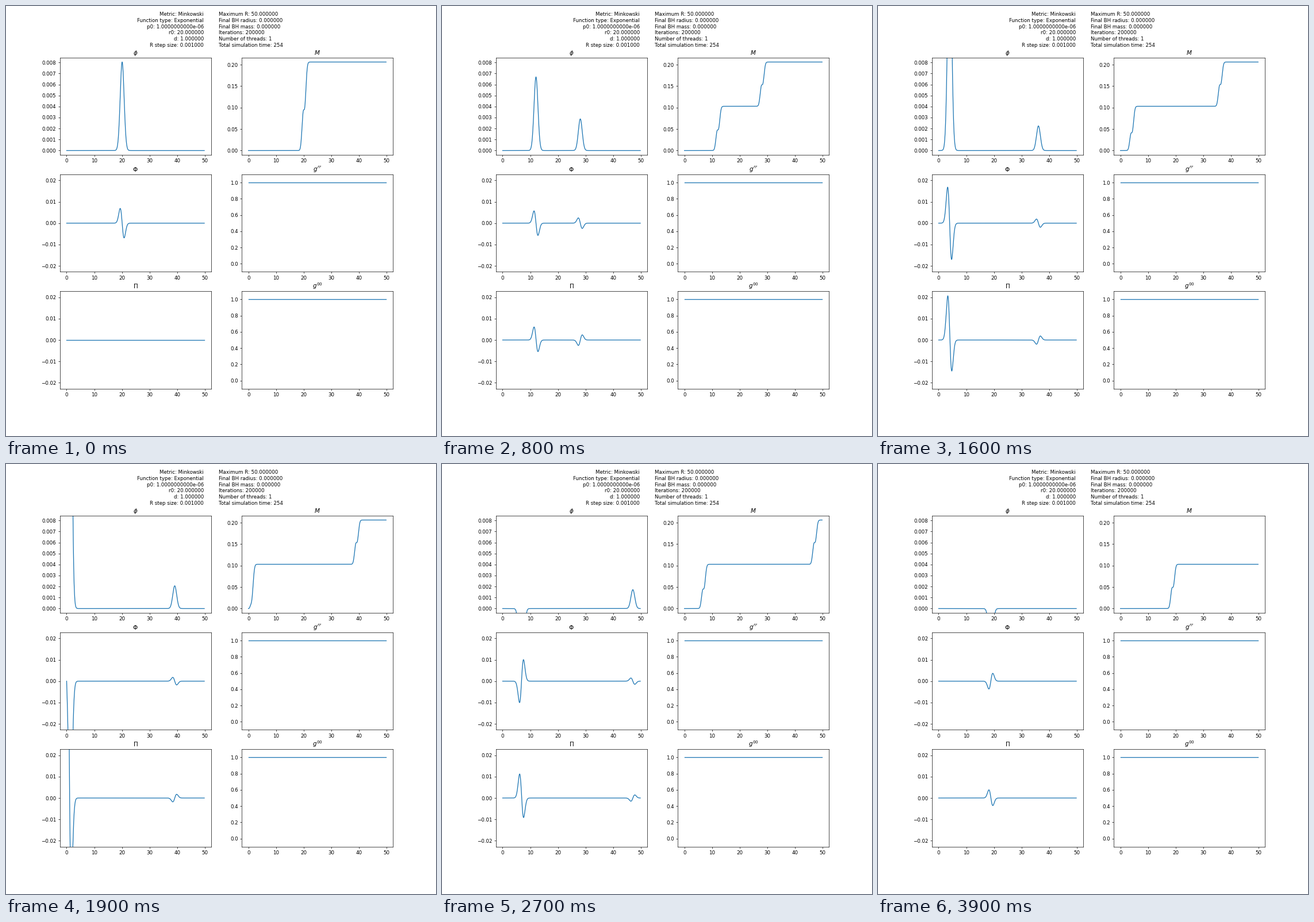
These frames come from a looping animation (748 by 748 pixels, 4000 ms). A matplotlib script:

```python
import numpy as np
import matplotlib.pyplot as plt
from matplotlib.animation import FuncAnimation

SIZE = 748
FRAMES, INTERVAL = 40, 100
P0, R0 = 1e-6, 20.0

r = np.arange(0, 49.81, 0.05)
r[0] = 1e-4  # keep divisions by r finite


def profile(s):
    """Odd extension of r * phi at the start."""
    a = np.abs(s)
    return P0 * s * a**3 * np.exp(-(a - R0)**2)


def slope(s):
    a = np.abs(s)
    return P0 * a**3 * np.exp(-(a - R0)**2) * (4 - 2 * a * (a - R0))


def fields(t):
    """Spherical wave: field, radial and time derivatives, enclosed mass."""
    out, inc = r - t, r + t
    phi = (profile(inc) + profile(out)) / (2 * r)
    grad = ((slope(inc) + slope(out)) / 2 - phi) / r
    rate = (slope(inc) - slope(out)) / (2 * r)
    density = 2 * np.pi * r**2 * (grad**2 + rate**2)
    steps = np.diff(r) * (density[1:] + density[:-1]) / 2
    mass = np.concatenate([[0], np.cumsum(steps)])
    return phi, mass, grad, rate


def padded(top):
    return -0.05 * top, 1.05 * top


plt.rcParams["font.family"] = "DejaVu Sans"
plt.rcParams["font.size"] = 10
fig, axes = plt.subplots(3, 2, figsize=(12, 12), dpi=SIZE / 12)
fig.subplots_adjust(left=0.125, right=0.9, bottom=0.11, top=0.88,
                    wspace=0.2, hspace=0.2)

HEADER_LEFT = ["Metric: Minkowski", "Function type: Exponential",
               "p0: 1.0000000000e-06", "r0: 20.000000", "d: 1.000000",
               "R step size: 0.001000"]
HEADER_RIGHT = ["Maximum R: 50.000000", "Final BH radius: 0.000000",
                "Final BH mass: 0.000000", "Iterations: 200000",
                "Number of threads: 1", "Total simulation time: 254"]
for i, (left, right) in enumerate(zip(HEADER_LEFT, HEADER_RIGHT)):
    y = 1 - (17 + 10.8 * i) / SIZE
    fig.text(0.46, y, left, ha="right", va="baseline")
    fig.text(0.495, y, right, ha="left", va="baseline")

phi, mass, grad, rate = fields(0)
flat = np.ones_like(r)
wave_lim, metric_lim = (-0.0228, 0.0228), (-0.1, 1.1)
panels = [
    (r"$\phi$", phi, padded(phi.max())),
    (r"$M$", mass, padded(mass[-1])),
    (r"$\Phi$", grad, wave_lim),
    (r"$g^{rr}$", flat, metric_lim),
    (r"$\Pi$", rate, wave_lim),
    (r"$g^{00}$", flat, metric_lim),
]
lines = []
for ax, (title, values, ylim) in zip(axes.flat, panels):
    line, = ax.plot(r, values, color="tab:blue", lw=1.5)
    ax.set_title(title)
    ax.set_xlim(*padded(r[-1]))
    ax.set_ylim(*ylim)
    lines.append(line)
moving = [lines[0], lines[1], lines[2], lines[4]]


def update(frame):
    for line, values in zip(moving, fields(float(frame))):
        line.set_ydata(values)
    return moving


anim = FuncAnimation(fig, update, frames=FRAMES, interval=INTERVAL,
                     repeat=True, repeat_delay=0, blit=False)
plt.show()
```
